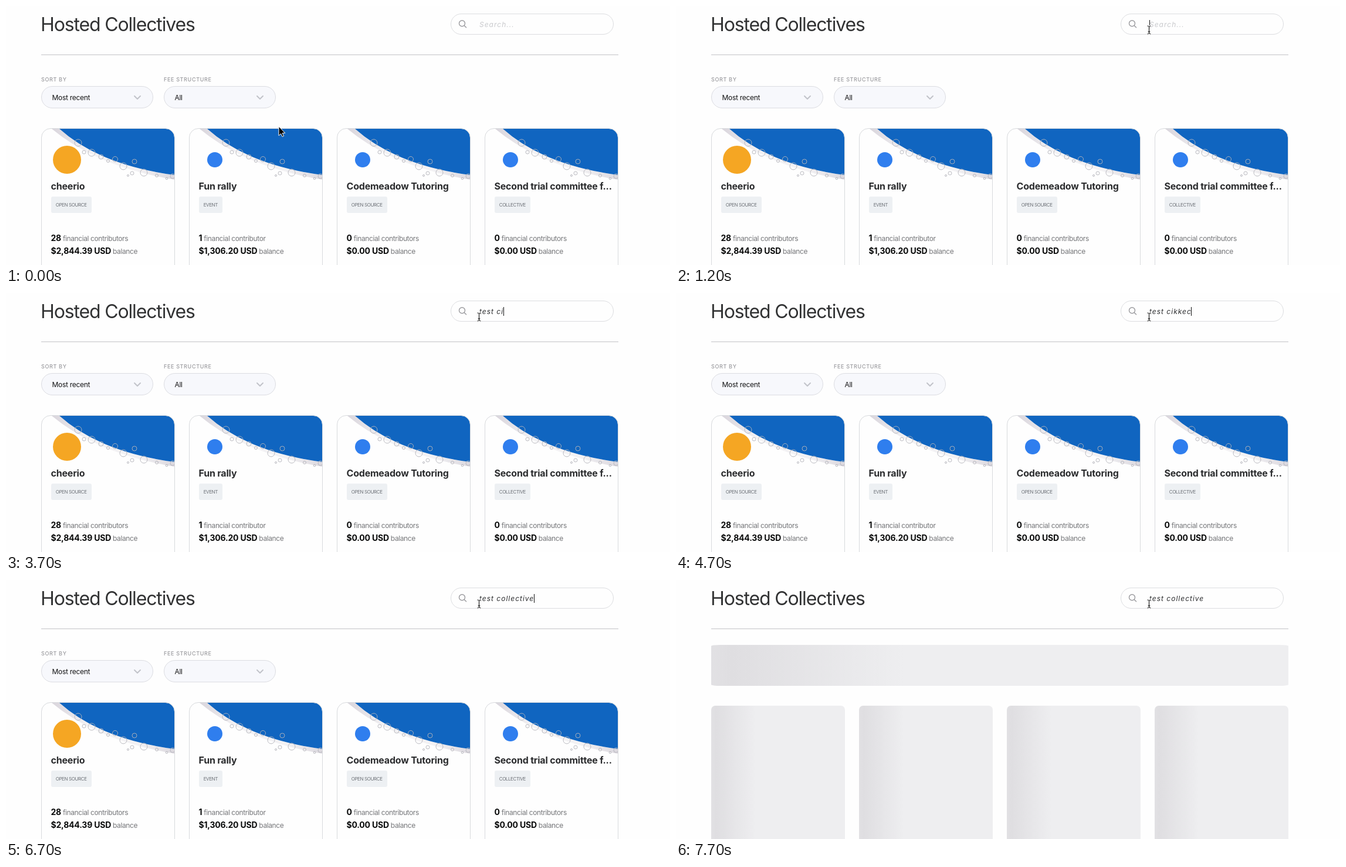
An HTML page that plays this animation: 1132 by 443 pixels, repeating every 8 s.

```html
<!DOCTYPE html>
<html lang="en">
<head>
<meta charset="utf-8">
<title>Hosted Collectives</title>
<style>
  html, body { margin: 0; width: 100%; height: 100%; overflow: hidden; background: #fefefe; }
  svg { display: block; width: 1132px; height: 443px; font-family: Inter, sans-serif; }
  text { white-space: pre; }
  .heading { font-size: 32px; letter-spacing: -1.15px; fill: #313233; }
  .label { font-size: 9px; font-weight: 500; letter-spacing: .65px; fill: #9a9a9e; }
  .option { font-size: 12px; letter-spacing: -.3px; fill: #141415; }
  .field { font-size: 12px; font-style: italic; letter-spacing: 1px; }
  .name { font-size: 16px; font-weight: 700; letter-spacing: -.2px; fill: #2b2c2e; }
  .tag { font-size: 8px; letter-spacing: -.4px; fill: #6a6e74; }
  .stat { font-size: 12px; letter-spacing: -.4px; fill: #76777a; }
  .stat tspan { font-size: 14px; font-weight: 700; letter-spacing: -.2px; fill: #090a0a; }
  .line { fill: none; stroke-linecap: round; stroke-linejoin: round; }
</style>
</head>
<body>
<svg viewBox="0 0 1132 443">
  <defs>
    <linearGradient id="shade">
      <stop offset="0" stop-color="#d9d5dc"/>
      <stop offset=".3" stop-color="#d9d5dc" stop-opacity=".3"/>
      <stop offset=".7" stop-color="#d9d5dc" stop-opacity=".3"/>
      <stop offset="1" stop-color="#d9d5dc" stop-opacity=".9"/>
    </linearGradient>
    <linearGradient id="shimmer">
      <stop offset=".08" stop-color="#eeeef0"/>
      <stop offset=".18" stop-color="#dfdee1"/>
      <stop offset=".33" stop-color="#eeeef0"/>
    </linearGradient>
    <clipPath id="cardClip"><rect x="1" y="1" width="226" height="260" rx="15"/></clipPath>
    <g id="banner" clip-path="url(#cardClip)">
      <path fill="url(#shade)" d="M18 1Q96 66 227 88V80Q100 63 31 1Z"/>
      <path fill="#1065c0" d="M31 1Q100 63 227 80V1Z"/>
      <g id="bubbles" fill="none" stroke="#b4b4ba" stroke-width=".9"/>
    </g>
  </defs>

  <text class="heading" x="59" y="43">Hosted Collectives</text>
  <rect x="758.5" y="13.5" width="277" height="35" rx="17.5" fill="#fefefe" stroke="#dcdde0"/>
  <g class="line" stroke="#9a9a9e" stroke-width="1.4">
    <circle cx="777.5" cy="29.8" r="5"/><path d="M781.2 33.5L784.6 36.8"/>
  </g>
  <path d="M60 83.5H1044" stroke="#c3c3c7"/>

  <g id="results"></g>
  <g id="skeleton"></g>

  <text class="field" id="query" x="807" y="36"></text>
  <rect id="caret" y="24" width="1" height="15" fill="#111"/>
  <g id="arrow">
    <path d="M.5 .5V16.2L4.1 12.8L6.6 18L9 16.9L6.6 11.8H11.3Z" fill="#000" stroke="#fff"/>
  </g>
  <g id="beam" class="line">
    <path id="beamShape" stroke="#fff" stroke-width="2.6"
      d="M-2.5-7Q0-7 0-5.2V5.2Q0 7-2.5 7M2.5-7Q0-7 0-5.2M0 5.2Q0 7 2.5 7M-1.5 3H1.5"/>
    <use href="#beamShape" id="beamInk"/>
  </g>
</svg>
<script>
const LOOP = 8000, STEP = 100;
const $ = id => document.getElementById(id);

const cards = [
  { name: 'cheerio', tag: 'OPEN SOURCE', tagWidth: 69, people: 28, money: '$2,844.39', color: '#f5a623', r: 24 },
  { name: 'Fun rally', tag: 'EVENT', tagWidth: 40, people: 1, money: '$1,306.20' },
  { name: 'Codemeadow Tutoring', tag: 'OPEN SOURCE', tagWidth: 69, people: 0, money: '$0.00' },
  { name: 'Second trial committee f...', tag: 'COLLECTIVE', tagWidth: 61, people: 0, money: '$0.00' }
];
const cardX = i => 60 + 252 * i;

// x, y, radius within a card
const bubbles = [
  [63, 25, 6], [73, 41, 3], [86, 42, 6], [102, 49, 4], [114, 56, 2.5], [126, 53, 4.5],
  [140, 65, 6], [148, 81, 1.5], [155, 77, 3], [159, 57, 4], [175, 76, 6],
  [197, 81, 2.5], [214, 86, 1.8], [224, 82, 4]
];

const select = (x, label, value) => `
  <text class="label" x="${x}" y="129">${label}</text>
  <rect x="${x + .5}" y="137.5" width="190" height="37" rx="18.5" fill="#f7f8fc" stroke="#dcdde2"/>
  <text class="option" x="${x + 18.5}" y="161">${value}</text>
  <path class="line" d="M${x + 159} 154l5 5l5-5" stroke="#c2c4ca" stroke-width="2"/>`;

const card = ({ name, tag, tagWidth, people, money, color = '#2f7eee', r = 13 }, i) => `
  <g transform="translate(${cardX(i)} 209)">
    <use href="#banner"/>
    <rect x=".5" y=".5" width="227" height="300" rx="15.5" fill="none" stroke="#d8dadd"/>
    <circle cx="44" cy="54" r="${r}" fill="${color}"/>
    <text class="name" x="16.5" y="105">${name}</text>
    <rect x="17" y="117" width="${tagWidth}" height="28" rx="3" fill="#edf0f3"/>
    <text class="tag" x="24.7" y="134">${tag}</text>
    <text class="stat" x="16.5" y="193"><tspan>${people}</tspan> financial contributor${people === 1 ? '' : 's'}</text>
    <text class="stat" x="16.5" y="215"><tspan>${money} USD</tspan> balance</text>
  </g>`;

$('bubbles').innerHTML = bubbles.map(([x, y, r]) => `<circle cx="${x}" cy="${y}" r="${r}"/>`).join('');
$('results').innerHTML = select(60, 'SORT BY', 'Most recent') + select(269, 'FEE STRUCTURE', 'All') + cards.map(card).join('');
$('skeleton').innerHTML = '<rect x="60" y="111" width="984" height="70" rx="16" ry="2"/>' +
  cards.map((_, i) => `<rect x="${cardX(i)}" y="215" width="228" height="300" rx="7"/>`).join('');
$('beamInk').setAttribute('style', 'stroke:#000');
$('beamShape').removeAttribute('stroke');
$('beamShape').removeAttribute('stroke-width');
const halo = document.createElementNS('http://www.w3.org/2000/svg', 'use');
halo.setAttribute('href', '#beamGlyph');
$('beamShape').id = 'beamGlyph';
$('beamInk').setAttribute('href', '#beamGlyph');
halo.setAttribute('style', 'stroke:#fff;stroke-width:2.8');
$('beam').insertBefore(halo, $('beamInk'));

const typing = [
  [0, ''], [2100, 't'], [2200, 'te'], [2400, 'tes'], [2500, 'test'], [3300, 'test '],
  [3600, 'test c'], [3700, 'test ci'], [3900, 'test cik'], [4000, 'test cikk'],
  [4200, 'test cikkec'], [4400, 'test cikkect'], [4700, 'test cikkec'], [4800, 'test cikke'],
  [5100, 'test cik'], [5300, 'test c'], [5600, 'test co'], [5800, 'test col'], [5900, 'test coll'],
  [6000, 'test colle'], [6200, 'test collec'], [6400, 'test collect'], [6500, 'test collecti'],
  [6600, 'test collectiv'], [6700, 'test collective']
];
const nudges = [[0, 0], [1300, 1], [1400, 2], [1900, 0]];
const shimmer = [[7000, null], [7500, .33], [7700, -.325]];

const at = (steps, t) => steps.reduce((value, [from, next]) => t >= from ? next : value, steps[0][1]);
const show = (id, on) => $(id).style.display = on ? '' : 'none';

function drawPointer(t) {
  const k = Math.min(1, Math.max(0, (t - 500) / 700));
  const p = k * k * (3 - 2 * k);
  const x = 464.5 + 342 * p, y = 205.5 - 164.5 * p + at(nudges, t);
  const inField = x > 760 && y < 49;
  show('arrow', !inField);
  show('beam', inField);
  $(inField ? 'beam' : 'arrow').setAttribute('transform', `translate(${x} ${y})`);
}

function drawField(t) {
  const typed = at(typing, t), query = $('query');
  query.textContent = typed || 'Search...';
  query.style.fill = typed ? '#2b2c2e' : '#c9cacd';
  $('caret').setAttribute('x', Math.floor(807 + (typed ? query.getComputedTextLength() : 0)));
  show('caret', t >= 1200 && t < 7300);
}

function drawResults(t) {
  const loading = t >= 7000, shift = at(shimmer, t);
  show('results', !loading);
  show('skeleton', loading);
  $('skeleton').setAttribute('fill', shift === null ? '#edebee' : 'url(#shimmer)');
  if (shift !== null) {
    $('shimmer').setAttribute('x1', shift);
    $('shimmer').setAttribute('x2', shift + 2);
  }
}

function frame() {
  const t = Math.floor(performance.now() % LOOP / STEP) * STEP;
  drawPointer(t);
  drawField(t);
  drawResults(t);
  requestAnimationFrame(frame);
}
frame();
</script>
</body>
</html>
```
